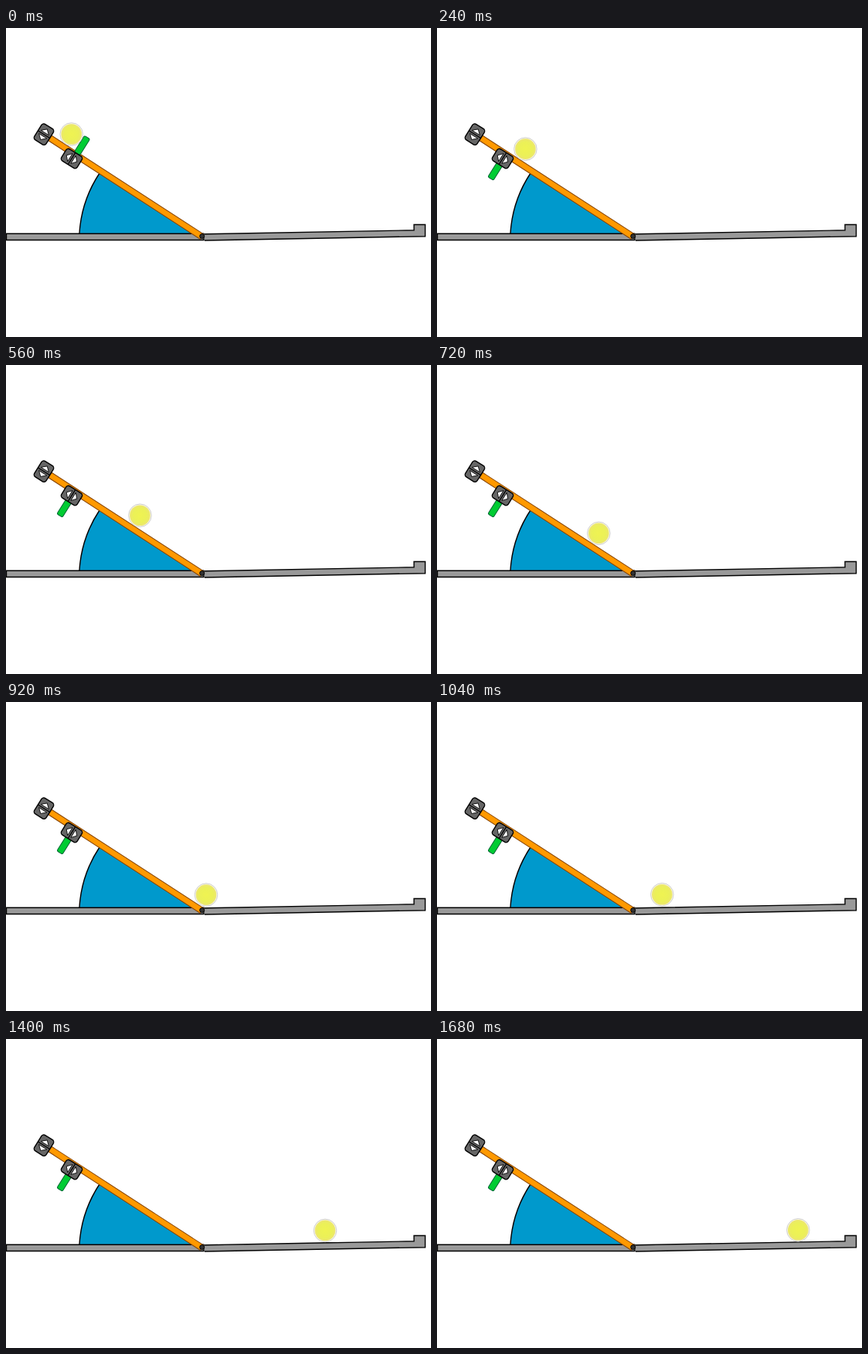
An HTML page that plays this animation: 550x400 px, repeating every 4760 ms.

```html
<!DOCTYPE html>
<html lang="en">
<head>
<meta charset="utf-8">
<title>Ball on a ramp</title>
<style>
  html, body { margin: 0; width: 100%; height: 100%; overflow: hidden; background: #fff; }
  svg { display: block; width: 550px; height: 400px; }
</style>
</head>
<body>
<svg viewBox="0 0 550 400">
  <defs>
    <radialGradient id="felt">
      <stop offset="0" stop-color="#eff352"/>
      <stop offset=".7" stop-color="#ebf058"/>
      <stop offset="1" stop-color="#ece670"/>
    </radialGradient>
    <g id="knob" stroke="#000">
      <rect x="-9" y="-12" width="18" height="24" rx="3.5" fill="#666" stroke-width="1.4"/>
      <path d="M-9 0H9" stroke-width="1.2"/>
      <path d="M-6 -2.5H6L0 -8ZM-6 2.5H6L0 8Z" fill="#fff" stroke-width=".8"/>
    </g>
  </defs>

  <path d="M95 266A159 159 0 0 1 121 188L253 269V266Z" fill="#09c"/>
  <path d="M95 266A159 159 0 0 1 121 188" fill="none" stroke="#000" stroke-width="1.4"/>
  <path d="M.5 266.3H256V274.5H.5Z" fill="#999" stroke="#000" stroke-width="1.4"/>
  <rect x="-234" y="-3.4" width="234" height="7.8" fill="#f90" stroke="#840" stroke-width="1"
        transform="translate(253.5 269.5) rotate(33)"/>
  <path d="M257 266.7L528 261.8V254.5H542.5V269.7L257 275" fill="#999" stroke="#000" stroke-width="1.4"/>
  <circle cx="253.7" cy="269.5" r="3" fill="#333" stroke="#000"/>

  <rect id="stop" x="-4.2" width="8.4" height="24.7" rx="2" fill="#0c3" stroke="#063"/>
  <use href="#knob" transform="translate(49 137.7) rotate(32)"/>
  <use href="#knob" transform="translate(85 169) rotate(122)"/>

  <g id="ball">
    <circle r="14.8" fill="#f7f5e6" stroke="#ccc" stroke-width=".9"/>
    <circle r="13.3" fill="url(#felt)"/>
  </g>
</svg>
<script>
const LOOP = 4760, RELEASE = 120, START = 84.7, FOOT = 259;
const ball = document.getElementById('ball');
const stop = document.getElementById('stop');

// Key points of the roll: time, x, and the tick in ms from there on
const keys = [
  [RELEASE, 90.5, 40], [400, 146.3, 40], [640, 187, 40], [720, 209.3, 40], [920, FOOT, 80],
  [1200, 372, 120], [1320, 393, 80], [1400, 413, 120], [1680, 467.3, LOOP]
];

function ballX(t) {
  if (t < RELEASE) return START;
  const i = keys.findLastIndex(k => k[0] <= t);
  const [t0, x0, tick] = keys[i];
  const [t1, x1] = keys[i + 1] || [LOOP, x0];
  const ticked = Math.floor((t - t0) / tick) * tick;
  return x0 + (x1 - x0) * ticked / (t1 - t0);
}

const ballY = x => x < FOOT ? 137.5 + (x - START) * 0.645 : 249.6 - (x - FOOT) * 0.011;

function draw(now) {
  const t = now % LOOP;
  const x = ballX(t);
  ball.setAttribute('transform', `translate(${x} ${ballY(x)})`);
  stop.setAttribute('transform', t < RELEASE
    ? 'translate(92 162.5) rotate(212)'
    : 'translate(82.5 174) rotate(32)');
  requestAnimationFrame(draw);
}
draw(0);
</script>
</body>
</html>
```
